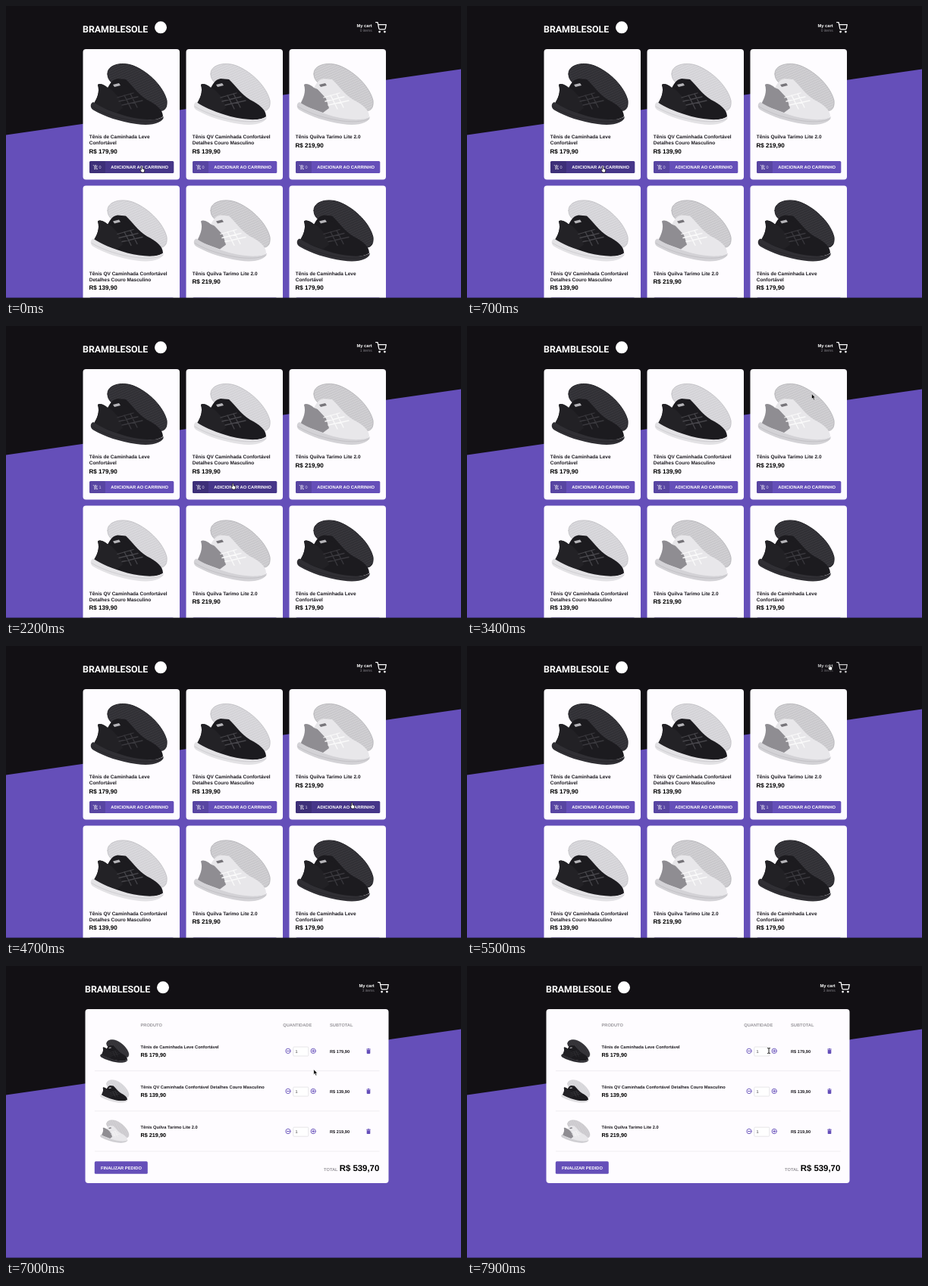
Animation, 600 px wide and 386 px high, one loop 8000 ms. Source, as an HTML page:

```html
<!DOCTYPE html>
<html lang="pt-BR">
<head>
<meta charset="utf-8">
<title>Loja de tênis</title>
<style>
  html, body { margin: 0; width: 100%; height: 100%; overflow: hidden; background: #121014; }
  svg { display: block; width: 100%; height: 100%; }
  text { font: 700 6.5px "Liberation Sans", Arial, sans-serif; text-rendering: geometricPrecision; }
  .line { fill: none; stroke-linecap: round; stroke-linejoin: round; }
</style>
</head>
<body>
<svg id="stage" viewBox="0 0 600 386" xmlns="http://www.w3.org/2000/svg"></svg>
<script>
const PURPLE = [101, 79, 185], HOVERED = [70, 54, 137];
const LOOP = 8000, STEP = 100, CHECKOUT_AT = 6000;
const rgb = c => `rgb(${c.map(Math.round)})`;
const mix = (a, b, k) => a.map((v, i) => v + (b[i] - v) * k);

const PRODUCTS = [
  { lines: ['Tênis de Caminhada Leve', 'Confortável'], price: 'R$ 179,90', addedAt: 1000,
    upper: '#1c1b1f', detail: '#39383d', sole: '#302f34', back: '#3a393e', ridge: '#242328', heel: '#222125' },
  { lines: ['Tênis QV Caminhada Confortável', 'Detalhes Couro Masculino'], price: 'R$ 139,90', addedAt: 2800,
    upper: '#1c1b1f', detail: '#46454a', sole: '#e3e2e5', back: '#dddce0', ridge: '#c6c5c9', heel: '#232226' },
  { lines: ['Tênis Quilva Tarimo Lite 2.0'], price: 'R$ 219,90', addedAt: 4300,
    upper: '#e8e7ea', detail: '#fafafa', sole: '#d3d2d6', back: '#d4d3d6', ridge: '#bab9bd', heel: '#8f8d92' }
];
const SHELF = [0, 1, 2, 1, 2, 0];

// Cursor way points: time, x, y
const PATH = [
  [0, 180, 216], [1400, 180, 216], [1500, 216, 211], [1800, 268, 209], [2200, 300, 212],
  [2900, 300, 212], [3150, 400, 132], [3400, 457, 94], [3600, 460, 120], [4000, 458, 205],
  [4200, 457, 211], [4700, 457, 211], [5000, 462, 130], [5300, 476, 42], [5500, 479, 28],
  [6300, 479, 28], [6600, 452, 84], [6900, 412, 148], [7200, 401, 127],
  [7500, 404, 114], [7800, 398, 112], [8000, 398, 112]
];

const text = (x, y, value, size = 6.5, fill = '#1c1a20', extra = '') =>
  `<text x="${x}" y="${y}" style="font-size:${size}px" fill="${fill}" ${extra}>${value}</text>`;
const rect = (x, y, w, h, fill, r = 0, extra = '') =>
  `<rect x="${x}" y="${y}" width="${w}" height="${h}" rx="${r}" fill="${fill}" ${extra}/>`;

function shoe(index) {
  const p = PRODUCTS[index];
  const back = 'M134 90C133 78 152 73 168 79C190 88 208 108 212 125C213 136 208 140 200 138C184 131 160 115 146 106C138 101 134 97 134 90Z';
  return `
    <path d="${back}" fill="${p.back}"/><path d="${back}" fill="url(#ridge${index})"/>
    <path d="${back}" class="line" stroke="${p.ridge}"/>
    <path d="M121 104C124 101 131 105 134 108C137 104 139 97 147 96L158 97C166 104 174 117 186 124C198 130 207 137 207 146C196 154 170 151 150 145L115 130C120 122 124 114 121 104Z" fill="${p.upper}"/>
    <path d="M121 104C124 101 131 105 134 108C140 111 145 111 148 116L154 135L146 141L116 130C120 122 124 114 121 104Z" fill="${p.heel}"/>
    <path d="M136 107C142 101 151 101 160 105L168 115L150 122Z" fill="${p.upper}"/>
    <path d="M147 121L168 115M149 126L174 120M153 131L180 125M156 118L165 136M164 116L173 134" class="line" stroke="${p.detail}" stroke-width="1.3"/>
    <path d="M141 104L149 102L151 105L143 107Z" fill="${index === 2 ? '#77757a' : '#b5b4b8'}"/>
    <path d="M115 127C111 128 110 135 116 138C130 146 150 153 172 156C191 159 207 155 208 146C200 152 180 151 160 146C140 140 125 134 115 127Z" fill="${p.sole}"/>
    <path d="M113 133C130 143 150 149 172 152C190 154 202 152 207 149" class="line" stroke="${p.ridge}" stroke-width=".7"/>`;
}

const cartIcon = (x, y) => `<g transform="translate(${x} ${y}) scale(.62)" class="line" stroke="#fff" stroke-width="2">
  <path d="M1 1h4l2.7 13.4a2 2 0 0 0 2 1.6h9.7a2 2 0 0 0 2-1.6L23 6H6"/>
  <circle cx="9" cy="21" r="1.2"/><circle cx="20" cy="21" r="1.2"/></g>`;

const addIcon = (x, y) => `<g transform="translate(${x} ${y}) scale(.28)" class="line" stroke="#fff" stroke-width="2">
  <path d="M1 2h3l4 9h8l4-7M8 11l-2 4h13M12 1v6M9 4h6"/>
  <circle cx="8" cy="20" r="1.3"/><circle cx="18" cy="20" r="1.3"/></g>`;

function card(index, slot) {
  const p = PRODUCTS[index], x = slot % 3 * 136, y = Math.floor(slot / 3) * 180.5;
  return `<g transform="translate(${x} ${y})">
    ${rect(101.5, 57, 127.5, 172.5, '#fefcff', 4)}
    ${shoe(index)}
    ${p.lines.map((line, i) => text(109.7, 175.2 + i * 8, line)).join('')}
    ${text(109.5, 186.6 + (p.lines.length - 1) * 8, p.price, 8.1, '#000')}
    ${rect(110, 205, 111.3, 16, rgb(PURPLE), 1.6, 'class="button"')}
    ${rect(110, 205, 21, 16, '#000', 1.6, 'opacity=".12"')}
    ${addIcon(114.8, 210)}
    ${text(122.6, 215, 0, 5.5, '#ddd8f2', `class="count" data-product="${index}" font-weight="400"`)}
    ${text(138.3, 215.1, 'ADICIONAR AO CARRINHO', 5.8, '#fff')}
  </g>`;
}

function cartRow(index) {
  const p = PRODUCTS[index], purple = rgb(PURPLE);
  return `<g transform="translate(0 ${index * 53.1})">
    <g transform="translate(82.4 68.9) scale(.375)">${shoe(index)}</g>
    ${text(177.6, 109.3, p.lines.join(' '), 5.7)}
    ${text(177.5, 119.8, p.price, 7.25, '#000')}
    <g class="line" stroke="${purple}" stroke-width=".9">
      <circle cx="372" cy="112.3" r="3.2"/><circle cx="405.2" cy="112.3" r="3.2"/>
      <path d="M370.4 112.3h3.2M403.6 112.3h3.2M405.2 110.7v3.2"/>
    </g>
    ${rect(378.8, 107, 20, 12, '#fff', 1, 'stroke="#dddbe0" stroke-width=".7"')}
    ${text(381.5, 115.2, 1, 5.5, '#777', 'style="font-weight:400"')}
    ${text(427, 114.7, p.price, 5.65)}
    <path d="M475.3 109.6h1.4l.4-.6h1.8l.4.6h1.4v.9h-5.4zM475.7 111h4.6v4q0 .9-.8.9h-3q-.8 0-.8-.9z" fill="${purple}"/>
    ${rect(117, 138.4, 375.5, .7, '#e9e7ec')}
  </g>`;
}

const stage = document.getElementById('stage');
stage.innerHTML = `
  <defs>${PRODUCTS.map((p, i) => `<pattern id="ridge${i}" width="4" height="3" patternUnits="userSpaceOnUse" patternTransform="rotate(-24)">
    <path d="M0 1Q1 .2 2 1T4 1" class="line" stroke="${p.ridge}" stroke-width=".9"/></pattern>`).join('')}</defs>
  ${rect(0, 0, 600, 386, '#121014')}
  <path d="M0 170.5L600 83.5V386H0Z" fill="${rgb(PURPLE)}"/>
  <g id="header">
    ${text(101, 34.9, 'BRAMBLESOLE', 12.35, '#fff', 'id="brand"')}
    <circle cx="204" cy="28.3" r="8" fill="#fff"/>
    <g id="cartLink">
      ${text(482.6, 27.5, 'My cart', 5.75, '#fff', 'text-anchor="end"')}
      ${text(482.6, 34, '', 4.9, '#85838a', 'id="items" text-anchor="end"')}
      ${cartIcon(487, 21)}
    </g>
  </g>
  <g id="shop">${SHELF.map(card).join('')}</g>
  <g id="checkout">
    ${rect(104.5, 57, 400, 230, '#fefcff', 4)}
    ${text(177.5, 80, 'PRODUTO', 5.7, '#98969b')}
    ${text(365.3, 80, 'QUANTIDADE', 5.7, '#98969b')}
    ${text(427, 80, 'SUBTOTAL', 5.7, '#98969b')}
    ${PRODUCTS.map((_, i) => cartRow(i)).join('')}
    ${rect(116.8, 258.3, 70, 16.5, rgb(PURPLE), 1.6)}
    ${text(124.9, 268.7, 'FINALIZAR PEDIDO', 5.75, '#fff')}
    ${text(419, 270.7, 'TOTAL', 5.75, '#98969b')}
    ${text(492.3, 270.8, 'R$ 539,70', 11.4, '#000', 'text-anchor="end"')}
  </g>
  ${rect(0, 385.2, 600, .8, '#17122b', 0, 'opacity=".55"')}
  <g id="cursor">
    <path id="hand" d="M-1.6-3.6q.9-.9 1.6.1V-1l2 .5q1 .3.8 1.5L2.3 4h-3.6L-3 1q-.4-1 .5-1l.9.6z" fill="#fff" stroke="#000" stroke-width=".7"/>
    <path id="arrow" d="M-2.5-4.2V2.4l1.5-1.3L.1 3.8l1.3-.6L.3.7h2z" fill="#000" stroke="#fff" stroke-width=".5"/>
    <path id="beam" d="M-1.5-3.6Q0-3.6 0-2.7Q0-3.6 1.5-3.6M0-2.7V2.7M-1.5 3.6Q0 3.6 0 2.7Q0 3.6 1.5 3.6" class="line" stroke="#111" stroke-width=".9"/>
  </g>`;

const $ = id => document.getElementById(id);
$('brand').style.fontFamily = 'Roboto, sans-serif';
const buttons = [...stage.querySelectorAll('.button')];
const counts = [...stage.querySelectorAll('.count')];
[...counts, $('items')].forEach(el => el.style.fontWeight = 400);

function cursorAt(time) {
  const t = Math.max(0, time);
  const i = Math.max(1, PATH.findIndex(p => p[0] >= t));
  const [a, b] = [PATH[i - 1], PATH[i]];
  return mix(a, b, (t - a[0]) / (b[0] - a[0])).slice(1);
}

const inside = ([x, y], left, top, w, h) => x >= left && x <= left + w && y >= top && y <= top + h;
const overCart = point => inside(point, 462, 19, 42, 18);
const overButton = slot => point => slot < 3 && inside(point, 110 + slot * 136, 205, 111.3, 16);

// Share of the last 200 ms spent over an area: a linear hover transition
function hoverAmount(t, hit) {
  let hits = 0;
  for (let k = 0; k < 10; k++) hits += hit(cursorAt(t - k * 20));
  return hits / 10;
}

function draw(t) {
  const point = cursorAt(t), paying = t >= CHECKOUT_AT;
  const show = (id, on) => $(id).style.display = on ? '' : 'none';
  show('shop', !paying);
  show('checkout', paying);
  $('header').setAttribute('transform', `translate(${paying ? 3 : 0} 0)`);
  $('cartLink').setAttribute('opacity', 1 - .32 * hoverAmount(t, overCart));

  const added = PRODUCTS.map(p => +(t >= p.addedAt));
  $('items').textContent = `${added.reduce((a, b) => a + b)} items`;
  counts.forEach(el => el.textContent = added[el.dataset.product]);
  buttons.forEach((el, slot) => el.setAttribute('fill', rgb(mix(PURPLE, HOVERED, hoverAmount(t, overButton(slot))))));

  const typing = paying && inside(point, 378, 107, 21, 12);
  const pointing = overCart(point) || (paying
    ? inside(point, 401, 108, 8, 8)
    : buttons.some((_, slot) => overButton(slot)(point)));
  show('beam', typing);
  show('hand', pointing && !typing);
  show('arrow', !pointing && !typing);
  $('cursor').setAttribute('transform', `translate(${point})`);
}

function frame() {
  draw(Math.floor(performance.now() % LOOP / STEP) * STEP);
  requestAnimationFrame(frame);
}
frame();
</script>
</body>
</html>
```
